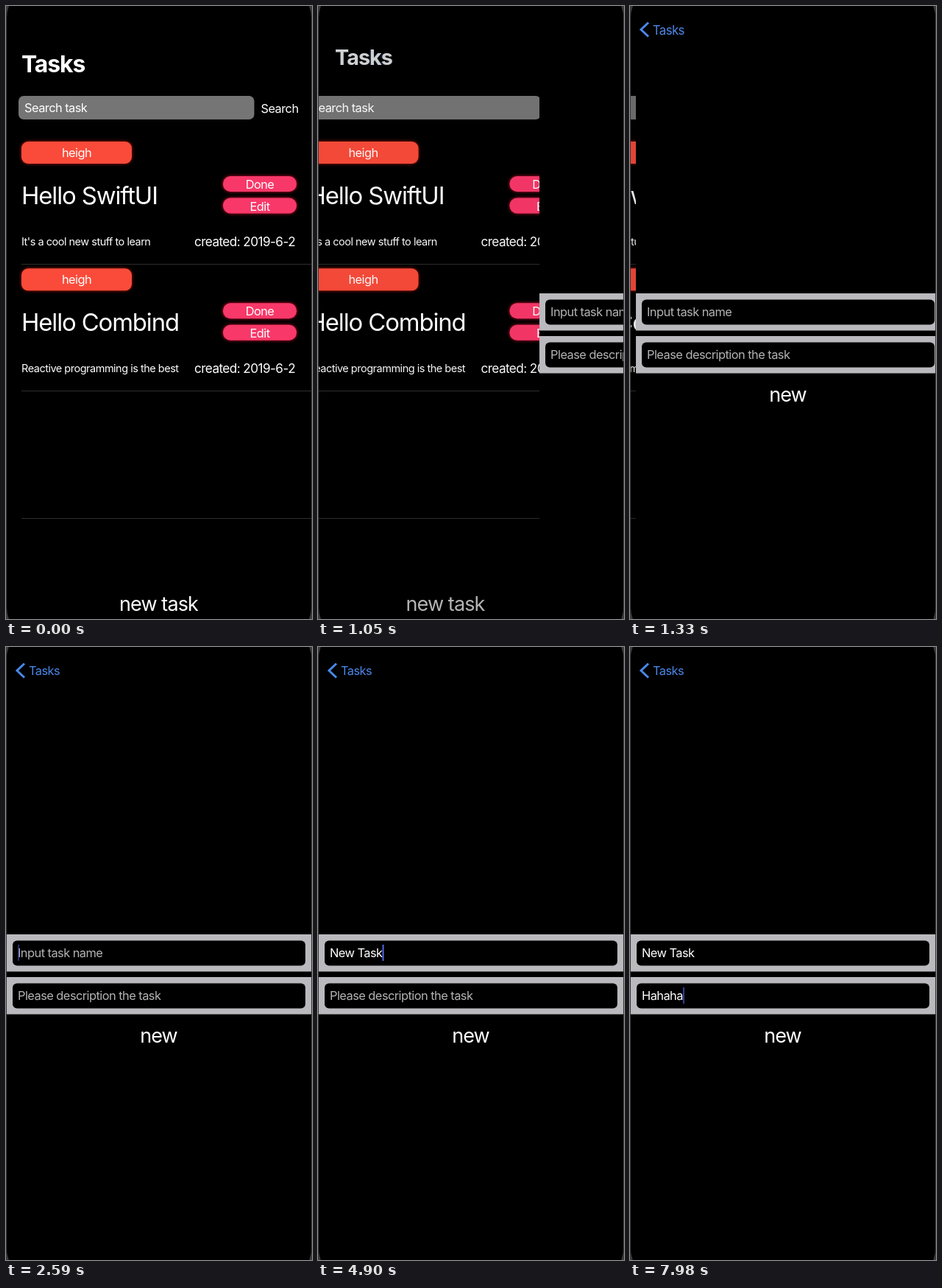
Recreate the animation shown at these times as an HTML page with a canvas. Size 416 px wide and 832 px high, loop 8000 ms.

```html
<!DOCTYPE html>
<html lang="en">
<head>
<meta charset="utf-8">
<title>Tasks</title>
<style>
html, body { margin: 0; width: 100%; height: 100%; overflow: hidden; background: #000; }
canvas { display: block; }
</style>
</head>
<body>
<canvas width="416" height="832"></canvas>
<script>
const ctx = document.querySelector('canvas').getContext('2d');
const LOOP = 8000, STEP = 70, WIDTH = 415;
const BLUE = '#4b87ea';

// Each edit: time, field content. An empty edit means the field got focus.
const nameEdits = [[1930, ''], [2730, 'N'], [2800, 'Ne'], [2870, 'New'], [3000, 'New '],
  [3840, 'New T'], [4540, 'New Ta'], [4680, 'New Tas'], [4830, 'New Task'], [4890, 'New Task']];
const noteEdits = [[5870, ''], [5990, ''], [6580, 'H'], [6650, 'Ha'], [6860, 'Hah'],
  [7000, 'Haha'], [7210, 'Hahah'], [7370, 'Hahaha']];

const clamp = v => Math.max(0, Math.min(1, v));
const lerp = (a, b, k) => a + (b - a) * k;

function text(str, x, y, size, { color = '#fff', align = 'left', weight = 400 } = {}) {
  const px = size * 0.967;
  ctx.font = `${weight} ${px}px Inter, Roboto, sans-serif`;
  ctx.letterSpacing = `${-0.034 * px}px`;
  ctx.textAlign = align;
  ctx.fillStyle = color;
  ctx.fillText(str, x, y);
}

function rounded(x, y, w, h, r, color, glow) {
  ctx.save();
  if (glow) {
    ctx.shadowColor = glow;
    ctx.shadowBlur = 4;
  }
  ctx.fillStyle = color;
  ctx.beginPath();
  ctx.roundRect(x, y, w, h, r);
  ctx.fill();
  ctx.restore();
}

function rect(x, y, w, h, color) {
  ctx.fillStyle = color;
  ctx.fillRect(x, y, w, h);
}

function withAlpha(alpha, draw) {
  ctx.save();
  ctx.globalAlpha = alpha;
  draw();
  ctx.restore();
}

function shifted(x, y, draw) {
  ctx.save();
  ctx.translate(x, y);
  draw();
  ctx.restore();
}

function pill(label, y) {
  rounded(295, y, 100, 21, 10, '#f83869', '#d01030');
  text(label, 345, y + 17, 17, { align: 'center' });
}

function taskRow(title, note) {
  rounded(21, 184, 150, 30, 9, '#fa4b3a', '#b01808');
  text('heigh', 96, 205, 17, { align: 'center' });
  text(title, 21, 269, 34);
  pill('Done', 231);
  pill('Edit', 260.5);
  text(note, 21, 325, 15);
  text('created: 2019-6-2', 324.5, 326, 17.8, { align: 'center' });
}

// The button dims while pressed and recovers on release.
function buttonAlpha(t) {
  return t < 910 ? 1 - 0.7 * clamp((t - 510) / 300) : 0.3 + 0.7 * clamp((t - 910) / 230);
}

function drawList(t) {
  rounded(17, 122, 320.5, 32, 7, '#757575');
  text('Search task', 25, 144, 17);
  text('Search', 372, 145, 17, { align: 'center' });
  taskRow('Hello SwiftUI', "It's a cool new stuff to learn");
  shifted(0, 172.3, () => taskRow('Hello Combind', 'Reactive programming is the best'));
  for (const y of [350, 522, 695]) rect(21, y, 500, 1, '#2e2e2e');
  withAlpha(buttonAlpha(t), () => text('new task', 207.5, 821, 28, { align: 'center' }));
}

function inputField(y, placeholder, edits, t, blurAt) {
  rect(1, y, 414, 50.5, '#b9b9be');
  rounded(9, y + 8.5, 398, 34, 6, '#000');
  const edit = edits.findLast(([time]) => time <= t);
  const value = edit ? edit[1] : '';
  text(value || placeholder, 16, y + 31, 17, { color: value ? '#fff' : '#b3b3b5' });
  if (!edit || t >= blurAt) return;
  const age = t - edit[0];
  const caretX = 16 + (value ? ctx.measureText(value).width : 0);
  withAlpha(age < 600 ? 1 : clamp(1 - (age - 520) / 250),
    () => rect(caretX, y + 14, 2, 22, '#4f68e6'));
}

function drawForm(t) {
  rect(1, 0, WIDTH, 832, '#000');
  inputField(390, 'Input task name', nameEdits, t, 5860);
  inputField(448, 'Please description the task', noteEdits, t, LOOP);
  text('new', 207.5, 536.5, 28, { align: 'center' });
}

// The large title shrinks into the back button.
function drawTitle(p) {
  const k = p ** 1.27, x = lerp(21, 31, k), y = lerp(90, 38, k), size = lerp(33, 17, k);
  withAlpha(k, () => text('Tasks', x, y, size, { color: BLUE }));
  withAlpha(1 - k, () => text('Tasks', x, y, size, { weight: 700 }));
  withAlpha(clamp((p - 0.4) / 0.5), () => {
    ctx.strokeStyle = BLUE;
    ctx.lineWidth = 3;
    ctx.beginPath();
    ctx.moveTo(25, 22.5);
    ctx.lineTo(15, 32);
    ctx.lineTo(25, 41.5);
    ctx.stroke();
  });
}

// Critically damped spring for the page push.
function pushProgress(t) {
  const x = Math.max(0, t - 992) * 0.01784;
  return 1 - (1 + x) * Math.exp(-x);
}

function draw(now) {
  const t = Math.floor((now % LOOP) / STEP) * STEP;
  const p = pushProgress(t);
  rect(0, 0, 416, 832, '#3a3a3a');
  ctx.save();
  ctx.beginPath();
  ctx.roundRect(1, -29, 414, 890, 45);
  ctx.clip();
  rect(0, 0, 416, 832, '#000');
  if (p < 0.9999) {
    shifted(-0.3 * WIDTH * p, 0, () => drawList(t));
    rect(0, 0, 416, 832, `rgba(0,0,0,${0.1 * p})`);
  }
  if (p > 0) shifted(WIDTH * (1 - p), 0, () => drawForm(t));
  drawTitle(p);
  ctx.restore();
}

function tick() {
  draw(performance.now());
  requestAnimationFrame(tick);
}
tick();
</script>
</body>
</html>
```
